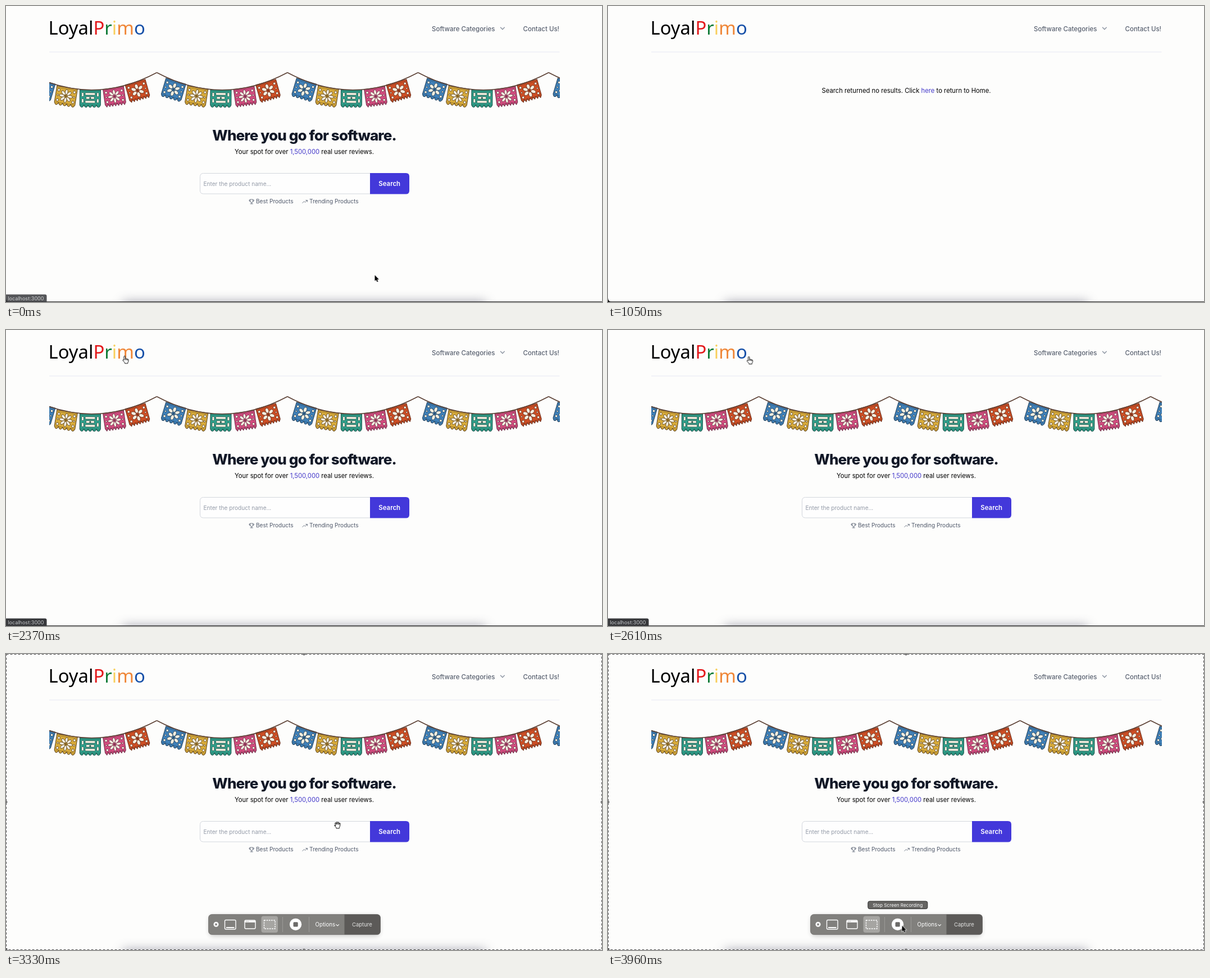
An HTML page for the animation above (3.99 s loop, 1061x528 px).

```html
<!DOCTYPE html>
<html lang="en">
<head>
<meta charset="utf-8">
<title>LoyalPrimo</title>
<style>
html, body { margin: 0; width: 100%; height: 100%; overflow: hidden; background: #fdfdfc; }
svg { display: block; width: 100%; height: 100%; }
text { font: 400 11.25px Inter, "Open Sans", sans-serif; }
.brand { font: 400 32.8px "Noto Sans", "Open Sans", sans-serif; }
.nav { font-size: 11.5px; font-weight: 500; fill: #596170; }
.title { font-size: 26px; font-weight: 800; letter-spacing: -.87px; fill: #111827; }
.link { fill: #4338ca; }
.field { font-size: 10.1px; }
.small { font-size: 10.1px; }
.head { font-size: 11.2px; font-weight: 600; }
.name { font-size: 10px; font-weight: 600; fill: #4f46e5; }
.button { font-size: 11.4px; font-weight: 600; fill: #fff; }
.mid { text-anchor: middle; }
.line { fill: none; stroke-linecap: round; stroke-linejoin: round; }

.step, .cursor, .status { animation: 3990ms step-end infinite; }
.home { animation-name: home; }
.empty { animation-name: empty; }
.table { animation-name: table; }
.hint { animation-name: hint; }
.focus { animation-name: focus; }
.capture { animation-name: capture; }
.tip { animation-name: tip; }
.arrow { animation-name: arrow; }
.beam { animation-name: beam; }
.hand { animation-name: hand; }
.grab { animation-name: grab; }
.status { animation-name: status; animation-timing-function: linear; }
.cursor { animation-name: move; animation-timing-function: ease-in-out; }
.typed tspan {
  visibility: hidden;
  animation: key 3990ms calc(600ms + var(--i) * 60ms) step-end infinite;
}

@keyframes home { 0% { opacity: 1 } 25.55% { opacity: 0 } 55.62%, 100% { opacity: 1 } }
@keyframes empty { 0% { opacity: 0 } 25.55% { opacity: 1 } 27.05%, 100% { opacity: 0 } }
@keyframes table { 0% { opacity: 0 } 27.05% { opacity: 1 } 55.62%, 100% { opacity: 0 } }
@keyframes hint { 0% { opacity: 1 } 15.02% { opacity: 0 } 40%, 100% { opacity: 1 } }
@keyframes focus { 0% { opacity: 0 } 10.5% { opacity: 1 } 40%, 100% { opacity: 0 } }
@keyframes capture { 0% { opacity: 0 } 82.69%, 100% { opacity: 1 } }
@keyframes tip { 0% { opacity: 0 } 96.95%, 100% { opacity: 1 } }
@keyframes key { 0% { visibility: visible } 25%, 100% { visibility: hidden } }
@keyframes status {
  0% { opacity: .85 } 3.5%, 55.6% { opacity: 0 } 57.5%, 69% { opacity: 1 } 72%, 100% { opacity: 0 }
}
@keyframes arrow {
  0% { opacity: 1 } 9.02% { opacity: 0 } 29.3% { opacity: 1 } 52.6% { opacity: 0 }
  66.1% { opacity: 1 } 82.69% { opacity: 0 } 93.2%, 100% { opacity: 1 }
}
@keyframes beam { 0% { opacity: 0 } 9.02% { opacity: 1 } 15.02%, 100% { opacity: 0 } }
@keyframes hand { 0% { opacity: 0 } 52.6% { opacity: 1 } 66.1%, 100% { opacity: 0 } }
@keyframes grab { 0% { opacity: 0 } 82.69% { opacity: 1 } 93.2%, 100% { opacity: 0 } }
@keyframes move {
  0%, .75% { transform: translate(656.5px, 480px) }
  9.8%, 29.3% { transform: translate(557px, 323px) }
  37.6%, 48.1% { transform: translate(577px, 209.5px) }
  53.9%, 56% { transform: translate(187px, 46px) }
  64%, 66% { transform: translate(250.5px, 48px) }
  81%, 84% { transform: translate(590px, 305px) }
  95.5%, 100% { transform: translate(523.5px, 484.5px) }
}
</style>
</head>
<body>
<svg viewBox="0 0 1061 528">
  <defs>
    <g id="swag"></g>
    <clipPath id="strip"><rect x="77" y="112" width="908.5" height="75"/></clipPath>
  </defs>
  <rect width="1061" height="528" fill="#fdfdfc"/>
  <rect x="208" y="528" width="646" height="30" fill="#44445c" opacity=".5" style="filter: blur(10px)"/>
  <path d="M0 527.5H1061" stroke="#2a2a2a"/>
  <path d="M0 528V521Q.5 527 6 528Z"/>

  <text class="brand" x="75.5" y="51">Loyal<tspan fill="#e3191b">P</tspan><tspan fill="#0c7a35">r</tspan><tspan fill="#f8cf5b">i</tspan><tspan fill="#ef8637">m</tspan><tspan fill="#1650a8">o</tspan></text>
  <text class="nav" x="758" y="44.5">Software Categories</text>
  <path class="line" d="M880.5 38.3l3.4 3.5 3.4-3.5" stroke="#8b93a1" stroke-width="1.4"/>
  <text class="nav" x="920.5" y="44.5">Contact Us!</text>
  <path d="M77 82H985.5" stroke="#e6e8f3"/>

  <g class="step home">
    <g id="bunting" clip-path="url(#strip)"></g>
    <text class="title mid" x="531" y="240">Where you go for software.</text>
    <text class="mid" x="531" y="264">Your spot for over <tspan class="link">1,500,000</tspan> real user reviews.</text>
    <path d="M648 298.5H351.5Q345.5 298.5 345.5 304.5V329Q345.5 335 351.5 335H648" fill="#fefefe" stroke="#d3d7dd"/>
    <text class="field step hint" x="351.5" y="320.5" fill="#949ba8">Enter the product name...</text>
    <text class="field typed" x="351.5" y="320.5"><tspan style="--i:0">D</tspan><tspan style="--i:1">o</tspan><tspan style="--i:2">r</tspan><tspan style="--i:3">v</tspan><tspan style="--i:4">a</tspan><tspan style="--i:5">s</tspan></text>
    <path d="M648 298H712Q718 298 718 304V329.500Q718 335.500 712 335.500H648Z" fill="#4338da"/>
    <rect class="step focus" x="345.8" y="299" width="302" height="35.5" rx="5" fill="none" stroke="#0c66bf" stroke-width="1.9"/>
    <text class="button mid" x="682.7" y="321">Search</text>
    <g class="line" stroke="#636b7b" stroke-width=".9">
      <path d="M434.8 345H439.5V348.5Q439.5 350.6 437.2 350.6T434.8 348.5ZM434.8 346H433V347Q433 348.8 434.8 348.8M439.5 346H441.4V347Q441.4 348.8 439.5 348.8M437.2 350.6V352.8M435 352.8H439.4"/>
      <path d="M527.8 351.3l2.8-2.8 2 1.7 3.6-3.6M533.7 346.5h2.7v2.7"/>
    </g>
    <g fill="#4f586a">
      <text class="small" x="445" y="352.3">Best Products</text>
      <text class="small" x="540" y="352.3">Trending Products</text>
    </g>
  </g>

  <text class="step empty mid" x="531" y="155">Search returned no results. Click <tspan class="link">here</tspan> to return to Home.</text>

  <g class="step table">
    <text class="head" x="124" y="132">Name</text>
    <text class="head" x="202.5" y="132">Description</text>
    <text class="head" x="630" y="132">Website</text>
    <text class="head" x="848" y="132">Rating</text>
    <path d="M71 137.7H992" stroke="#d9dce3"/>
    <rect x="71.5" y="146.3" width="45.5" height="30.7"/>
    <circle cx="79" cy="161.5" r="3.8" fill="#e5b43c"/>
    <text x="84.5" y="164.7" fill="#fff" style="font-size:8px;font-weight:500;letter-spacing:-.4px">DORVAS</text>
    <text class="name" x="124" y="165.2">Dorvas</text>
    <text class="small" x="202.5" y="165.2">Credit card services for start-ups all over the world.</text>
    <text class="small" x="630" y="165.2" fill="#4f46d8">https://dorvas.webflow.io/</text>
    <g id="stars" fill="#f59e0b"></g>
  </g>

  <g class="status">
    <path d="M0 514.5H69.5Q72.5 514.5 72.5 517.5V528H0Z" fill="#37383b"/>
    <text x="3.3" y="525" fill="#c6c8cb" style="font-size:9.1px">localhost:3000</text>
  </g>

  <g class="step capture">
    <rect x=".5" y=".5" width="1060" height="527" fill="none" stroke="#fff"/>
    <rect x=".5" y=".5" width="1060" height="527" fill="none" stroke="#4a4a4a" stroke-dasharray="4 3"/>
    <g fill="#777">
      <circle cx="530.5" cy="0" r="2.5"/><circle cx="530.5" cy="528" r="2.5"/>
      <circle cx="0" cy="264" r="2.5"/><circle cx="1061" cy="264" r="2.5"/>
    </g>
    <rect x="362" y="467" width="303" height="36" rx="7" opacity=".22" style="filter: blur(4px)"/>
    <rect x="360.5" y="464.5" width="306" height="36" rx="6" fill="#81807d"/>
    <path d="M602.5 464.5H660.5Q666.5 464.5 666.5 470.5V494.5Q666.5 500.5 660.5 500.5H602.5Z" fill="#5c5a58"/>
    <rect x="360.5" y="464.5" width="306" height="36" rx="6" fill="none" stroke="#6a6967" stroke-width=".7"/>
    <rect x="454.5" y="467.5" width="29.5" height="29.5" rx="4" fill="#a6a5a2"/>
    <path d="M492.5 469V496M539.5 469V496" stroke="#9b9a97"/>
    <circle cx="374" cy="482.3" r="4.5" fill="#fff"/>
    <path d="M372.3 480.6l3.4 3.4m0-3.4l-3.4 3.4" stroke="#6c6b69" stroke-width="1.2"/>
    <g fill="none" stroke="#fff" stroke-width="1.4">
      <rect x="389.5" y="474.5" width="19.5" height="16.5" rx="2"/>
      <path d="M392 488H406.5" stroke-width="2"/>
      <rect x="425" y="475" width="19" height="15" rx="2"/>
      <path d="M425 477.3H444" stroke-width="3"/>
      <rect x="459.5" y="475" width="19.5" height="15" stroke-dasharray="2.6 1.6"/>
    </g>
    <path d="M427 477h.9m1.2 0h.9m1.2 0h.9" stroke="#81807d"/>
    <circle cx="515.6" cy="482.3" r="10.6" fill="#fff"/>
    <rect x="511.5" y="478.2" width="8.2" height="8.2" rx="1.5" fill="#6c6b69"/>
    <text x="550.5" y="486" fill="#fff" style="font-size:9.75px">Options</text>
    <path class="line" d="M587.8 482.7l2.4 2.2 2.4-2.2" stroke="#fff" stroke-width="1.1"/>
    <text x="616" y="486" fill="#e4e4e3" style="font-size:9.5px">Capture</text>
    <g class="step tip">
      <rect x="462.8" y="441" width="106" height="13.6" rx="3" fill="#666563" stroke="#2c2c2c"/>
      <text class="mid" x="515.7" y="450.7" fill="#fff" style="font-size:8.2px">Stop Screen Recording</text>
    </g>
  </g>

  <g class="cursor">
    <path class="step arrow" d="M0 0V10.5L2.4 8.4 4.1 12.3 5.9 11.5 4.2 7.7H7.4Z" stroke="#fff" stroke-width="1.3" paint-order="stroke"/>
    <g class="step beam line">
      <path d="M-2.5-5.5Q0-5.5 0-3.8Q0-5.5 2.5-5.5M0-4V4M-2.5 5.5Q0 5.5 0 3.8Q0 5.5 2.5 5.5M-1.3 1.5H1.3" stroke="#222" stroke-width="1.1"/>
    </g>
    <path class="step hand line" d="M-1 6.5V1Q-1-.5.2-.5T1.4 1V4.5Q2.8 3.3 3.5 4.7Q5 3.9 5.5 5.3Q7 4.8 7 6.6V8.5Q6.8 10 5.8 11.2V12.8H.5V11.5L-3.2 7.3Q-3.5 5.6-1 6.5M1.4 4.5V6.5M3.5 4.7V6.7M5.5 5.3V7" style="fill:#fff" stroke="#111"/>
    <path class="step grab line" d="M-3.3 1.2L-4.3-3Q-4-4.7-2.8-4L-1.5-.8-1.8-4.7Q-1-6.2 0-4.9L.4-1 1-4.7Q2.2-5.8 2.7-4.3L2.5-.6 3.7-3.2Q5.2-3.8 5.1-2L4.3 2.6 3.3 4.6V6H-2.1V4.7L-5.5.8Q-5.5-.8-3.3 1.2" style="fill:#fff" stroke="#111"/>
  </g>
</svg>
<script>
const byId = id => document.getElementById(id);
const range = n => [...Array(n).keys()];
const span = 232.5, sag = 31, half = 18.5;

const ring = (n, cy, r, rx, ry) => range(n).map(i =>
  `<ellipse cy="${-r}" rx="${rx}" ry="${ry}" transform="translate(0 ${cy}) rotate(${i * 360 / n})"/>`).join('');

const box = (x, y, w, h) => `<rect x="${x}" y="${y}" width="${w}" height="${h}" rx="1"/>`;

const dots = (x, y, r) => [-x, x].map(cx => `<circle cx="${cx}" cy="${y}" r="${r}"/>`).join('');

const panes = box(-9, 5, 18, 4.5) + box(-9, 19, 18, 4.5) + box(-15.5, 5, 4, 7) + box(11.5, 5, 4, 7)
  + box(-15.5, 16, 4, 7) + box(11.5, 16, 4, 7) + box(-7.5, 12, 15, 4.5);

function flag({ x, hue, dark, petals, zig, h }) {
  const u = x / span;
  const y = 4 * sag * u * (1 - u);
  const tilt = Math.atan(4 * sag / span * (1 - 2 * u)) * 46;
  const teeth = zig ? 7 : 5, w = half / teeth;
  const hem = (zig ? `l${-w} 4 ${-w}-4` : `q${-w} 8 ${-2 * w} 0`).repeat(teeth);
  const mid = h / 2 + 1;
  const holes = petals
    ? ring(petals, mid, 7.2, petals > 6 ? 2.4 : 3, 4.6) + dots(14, 6.5, 2.3) + dots(14, h - 4.5, 2.3) + dots(14.5, mid, 1.5)
    : panes;
  return `<g transform="translate(${x} ${y}) rotate(${tilt})">
    <path d="M${-half} 0H${half}V${h}${hem}Z" fill="${hue}" stroke="${dark}" stroke-width="1.1"/>
    <path d="M-17.5 2.5H17.5M-17 ${h}H17" stroke="${dark}" stroke-width=".8" opacity=".6"/>
    <g fill="#f5efe0" stroke="${dark}" stroke-width=".9">${holes}</g>
    <circle cy="${mid}" r="1.6" fill="${dark}"/></g>`;
}

const flags = [
  { x: 34, hue: '#3f80b8', dark: '#27455f', petals: 6, h: 29 },
  { x: 73, hue: '#d8ab3a', dark: '#64491f', petals: 8, h: 29 },
  { x: 114, hue: '#2f9f8a', dark: '#1f554c', petals: 0, h: 27 },
  { x: 155, hue: '#d24c7f', dark: '#74304a', petals: 8, zig: true, h: 28 },
  { x: 194, hue: '#cd4e24', dark: '#6e301c', petals: 6, zig: true, h: 29 }
];

byId('swag').innerHTML = flags.map(flag).join('')
  + `<path d="M0 0Q${span / 2} ${2 * sag} ${span} 0" fill="none" stroke="#5b4034" stroke-width="1.6"/>`;
byId('bunting').innerHTML = range(5).map(i =>
  `<use href="#swag" x="${36 + i * span}" y="118.7"/>`).join('');

const star = range(10).map(i => {
  const r = i % 2 ? 3.2 : 8, a = i * Math.PI / 5;
  return `${(r * Math.sin(a)).toFixed(2)},${(-r * Math.cos(a)).toFixed(2)}`;
}).join(' ');
byId('stars').innerHTML = range(5).map(i =>
  `<polygon points="${star}" transform="translate(${851.7 + i * 17.75} 160.4)"/>`).join('');
</script>
</body>
</html>
```
